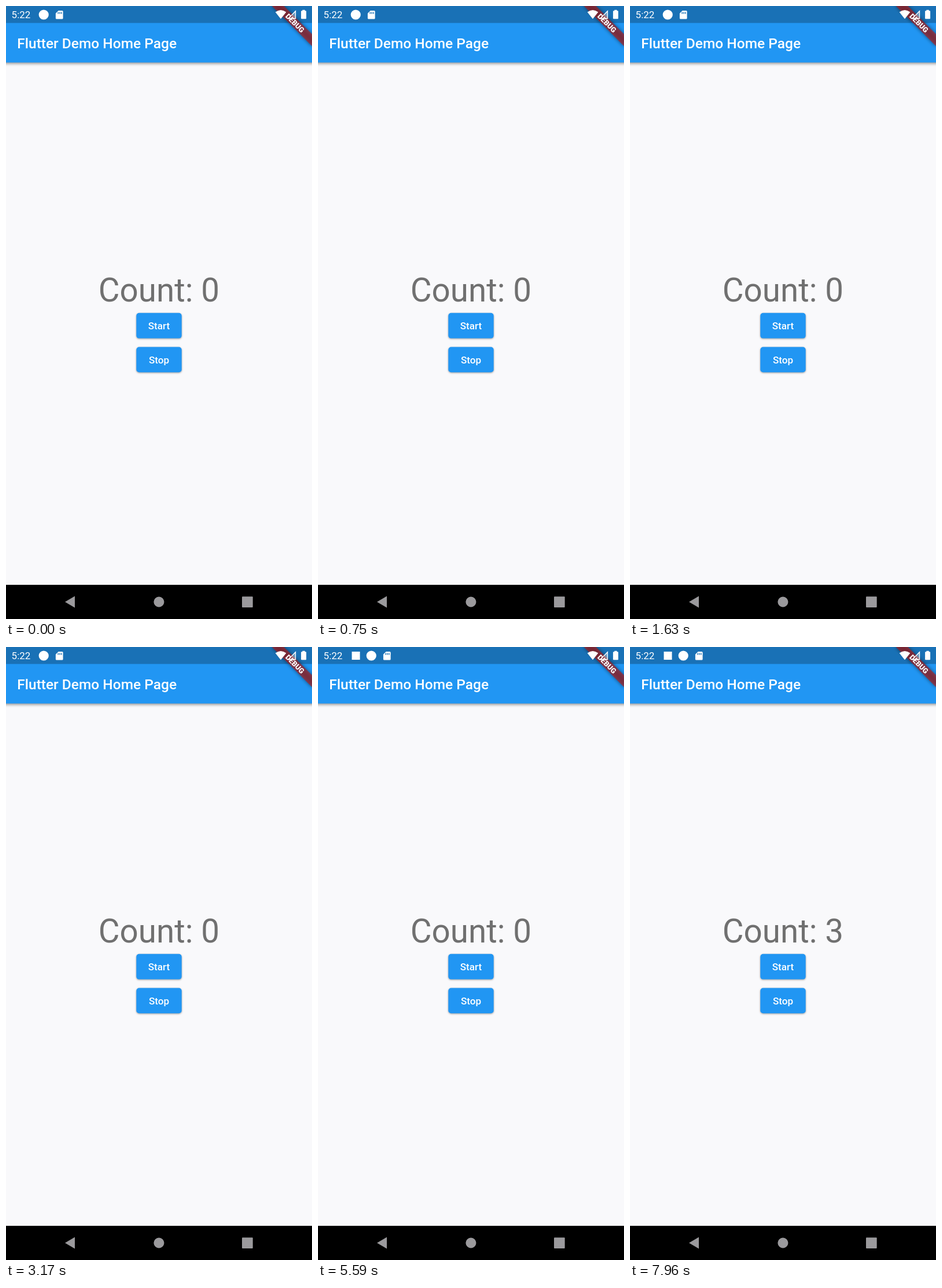
Recreate the animation shown at these times as an HTML page. Size 529 by 1058 pixels, loop 8000 ms.

```html
<!DOCTYPE html>
<html lang="en">
<head>
<meta charset="utf-8">
<title>Counter</title>
<style>
  html, body { margin: 0; width: 100%; height: 100%; overflow: hidden; background: #f9f9fb; }
  svg { display: block; width: 100%; height: 100%; font-family: Roboto, sans-serif; }
  .mid { text-anchor: middle; }
  .label { font-size: 17.1px; font-weight: 500; fill: #fff; }
  .bar { filter: drop-shadow(0 2px 2.5px rgba(0, 0, 0, .42)); }
  .button { fill: #2196f3; filter: drop-shadow(0 1.5px 1.5px rgba(0, 0, 0, .38)); }
  .ribbon { fill: rgba(183, 28, 28, .63); }
  .ribbon-shadow { fill: rgba(0, 0, 0, .5); filter: blur(3px); }

  /* A new notification pushes the older icons to the right. */
  #older { animation: push 8s infinite; }
  #fresh { animation: appear 8s infinite; }
  @keyframes push {
    0%, 45% { transform: none; animation-timing-function: ease-out; }
    47%, 100% { transform: translateX(27px); }
  }
  @keyframes appear {
    0%, 45% { opacity: 0; }
    47%, 100% { opacity: 1; }
  }
</style>
</head>
<body>
<svg viewBox="0 0 529 1058" preserveAspectRatio="none">
  <rect width="529" height="1058" fill="#f9f9fb"/>

  <rect class="bar" x="-10" y="-10" width="549" height="107.5" fill="#2196f3"/>
  <rect width="529" height="29.3" fill="#1971b6"/>
  <text x="19.3" y="73" font-size="24.5" font-weight="500" fill="#fff">Flutter Demo Home Page</text>

  <text id="count" class="mid" x="264.5" y="509.6" font-size="56.5" fill="#707070">Count: 0</text>

  <rect class="button" x="225.3" y="529.8" width="78.4" height="43.8" rx="4.9"/>
  <text class="mid label" x="264.5" y="558">Start</text>
  <rect class="button" x="225.3" y="588.5" width="78.4" height="43.8" rx="4.9"/>
  <text class="mid label" x="264.5" y="616.8">Stop</text>

  <g transform="translate(529 0) rotate(45)">
    <rect class="ribbon-shadow" x="-49" y="34.3" width="98" height="14.7"/>
    <rect class="ribbon" x="-49" y="34.3" width="98" height="14.7"/>
    <text class="mid" y="46.1" font-size="12.5" font-weight="900" fill="#fff">DEBUG</text>
  </g>

  <g fill="#fff">
    <text x="9.6" y="21.2" font-size="17">5:22</text>
    <rect id="fresh" x="58.5" y="8" width="14" height="14"/>
    <g id="older">
      <circle cx="65.2" cy="15" r="8.6"/>
      <path d="M90.6 8H97a1.6 1.6 0 0 1 1.6 1.6v11.3a1.6 1.6 0 0 1-1.6 1.6H87.5a1.6 1.6 0 0 1-1.6-1.6V12.7Z"/>
      <path d="M90.2 10.4v3.2M93 10.4v3.2M95.8 10.4v3.2" stroke="#1971b6" stroke-width="1.5"/>
    </g>
    <path d="M465.6 10.6Q475 3.6 484.4 10.6L475 22.3Z"/>
    <path d="M500.5 8.7V21.7H488Z" fill="none" stroke="#fff" stroke-width="1.4"/>
    <path d="M494.3 15.4L500.5 8.7V21.7H494.3Z" fill-opacity=".35"/>
    <path d="M512.4 8.2V6.8h4.4v1.4h1.3a1 1 0 0 1 1 1v12a1 1 0 0 1-1 1h-7a1 1 0 0 1-1-1v-12a1 1 0 0 1 1-1Z"/>
  </g>

  <rect y="999" width="529" height="59"/>
  <g fill="#9b9a9d">
    <path d="M102 1028.5L119 1018.5V1038.5Z"/>
    <circle cx="264.4" cy="1028.5" r="9"/>
    <rect x="408" y="1019.2" width="18.7" height="18.7" rx="1"/>
  </g>
</svg>
<script>
  const LOOP = 8000, TIMER_START = 4770, SECOND = 1000;
  const label = document.getElementById('count');
  let shown = 0;

  function tick(now) {
    const t = now % LOOP;
    const count = Math.max(0, Math.floor((t - TIMER_START) / SECOND));
    if (count !== shown) {
      shown = count;
      label.textContent = 'Count: ' + count;
    }
    requestAnimationFrame(tick);
  }
  requestAnimationFrame(tick);
</script>
</body>
</html>
```
